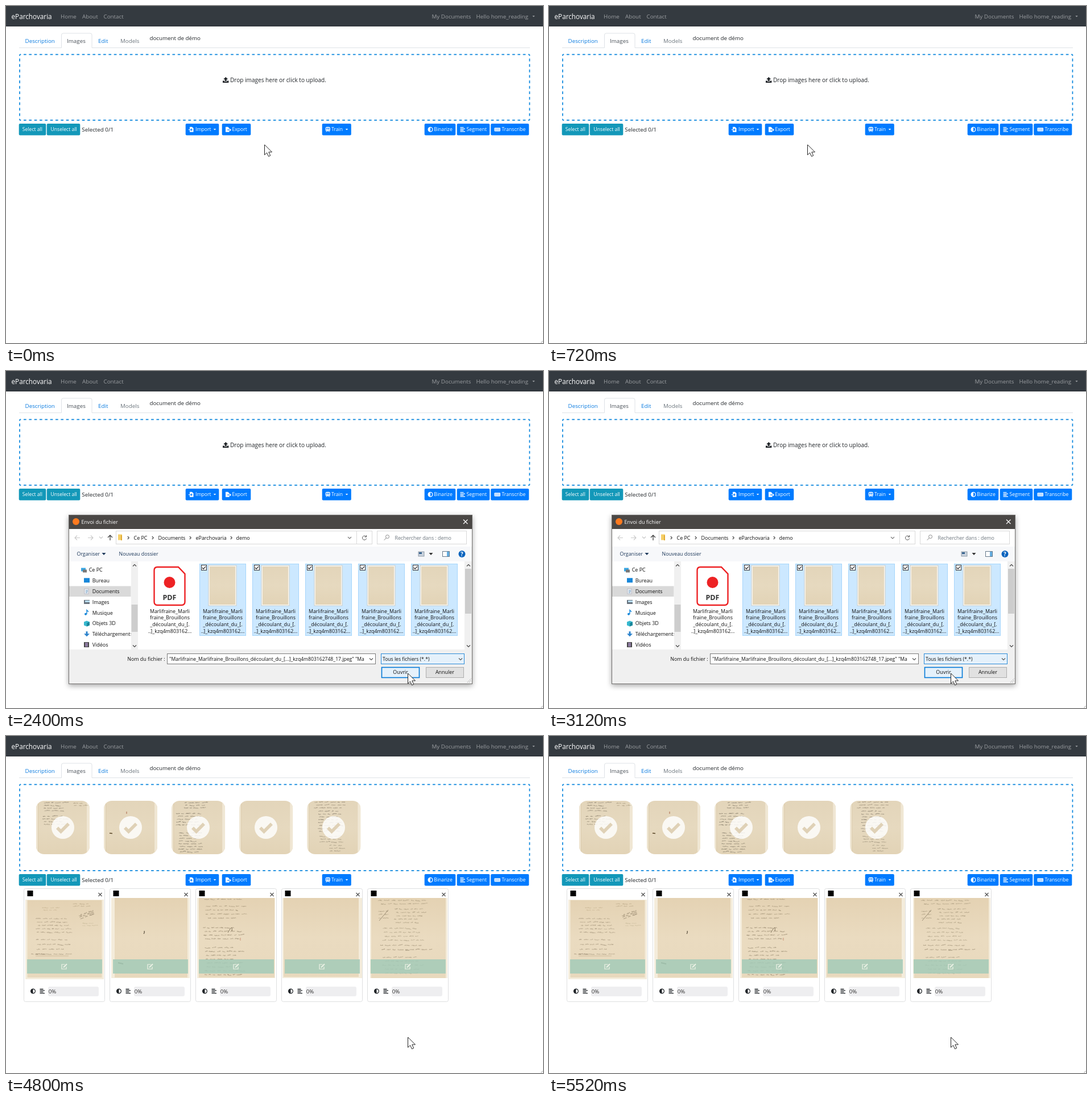
Animation of 944 by 593 pixels, one loop 6000 ms. Source, as an HTML page:

```html
<!DOCTYPE html>
<html lang="en">
<head>
<meta charset="utf-8">
<title>Image upload</title>
<style>
html, body { margin: 0; width: 100%; height: 100%; overflow: hidden; background: #fff; }
svg { display: block; width: 944px; height: 593px; font-family: "Open Sans", "Noto Sans", sans-serif; }
text { white-space: pre; }
</style>
</head>
<body>
<svg id="stage" viewBox="0 0 944 593"></svg>
<script>
const BLUE = '#007bff', INK = '#212529', GREY = '#6c757d';
const APP = 'eParchovaria';
const FILE = ['Marlifraine_Marli', 'fraine_Brouillons', '_découlant_du_[.', '..]_kzq4m803162...'];
const FILE_LIST = '"Marlifraine_Marlifraine_Brouillons_découlant_du_[...]_kzq4m803162748_17.jpeg" "Ma';

const rect = (x, y, w, h, fill, more = '') => `<rect x="${x}" y="${y}" width="${w}" height="${h}" fill="${fill}" ${more}/>`;
const frame = (x, y, w, h, fill, stroke, more = '') => rect(x + .5, y + .5, w - 1, h - 1, fill, `stroke="${stroke}" ${more}`);
const circle = (x, y, r, fill, more = '') => `<circle cx="${x}" cy="${y}" r="${r}" fill="${fill}" ${more}/>`;
const text = (x, y, s, size = 10, fill = INK, more = '') => `<text x="${x}" y="${y}" font-size="${size}" fill="${fill}" ${more}>${s}</text>`;
const line = (d, stroke, width = 1, more = '') => `<path d="${d}" fill="none" stroke="${stroke}" stroke-width="${width}" ${more}/>`;
const shape = (d, fill, more = '') => `<path d="${d}" fill="${fill}" ${more}/>`;
const at = (x, y, body) => `<g transform="translate(${x} ${y})">${body}</g>`;
const group = (id, body) => `<g id="${id}">${body}</g>`;
const each = (n, fn) => Array.from({ length: n }, (_, i) => fn(i)).join('');
const caret = (x, y, fill) => shape(`M${x - 2.2} ${y - 1}h4.4l-2.2 2.4z`, fill);
const chevron = (x, y, c, dir = 'down') => line({
  down: `M${x - 3} ${y - 1.5}l3 3 3-3`, up: `M${x - 3} ${y + 1.5}l3-3 3 3`, right: `M${x - 1.2} ${y - 2.5}l2.5 2.5-2.5 2.5`
}[dir], c, 1.1);

function random(seed) {
  return () => {
    seed = (seed * 1664525 + 1013904223) >>> 0;
    return seed / 4294967296;
  };
}

// Lines of illegible handwriting.
function scribble(x, y, w, rows, gap, seed, color = '#65563f', height = 2.6, opacity = .55) {
  const rnd = random(seed);
  let d = '';
  for (let row = 0; row < rows; row++) {
    let px = x + rnd() * w * .08;
    const end = x + w * (.72 + rnd() * .28);
    while (px < end) {
      d += `M${px.toFixed(1)} ${(y + row * gap).toFixed(1)}`;
      for (let n = 2 + rnd() * 5; n > 0; n--) {
        const step = .9 + rnd() * 1.1;
        d += `q${(step * .6).toFixed(1)} ${(-height * (.5 + rnd())).toFixed(1)} ${step.toFixed(1)} ${(rnd() * .8 - .4).toFixed(1)}`;
        px += step;
      }
      px += 2 + rnd() * 2;
    }
  }
  return line(d, color, .6, `opacity="${opacity}"`);
}

const icons = {
  upload: c => shape('M5.2 0L9.2 4H6.8V7.2H3.6V4H1.2ZM0 6.4H2.8V8H7.6V6.4H10.4V10H0Z', c),
  half: c => circle(4.5, 4.5, 3.9, 'none', `stroke="${c}" stroke-width="1.2"`) + shape('M4.5 .6A3.9 3.9 0 0 0 4.5 8.4Z', c),
  align: c => line('M0 1H6M0 3.4H8.5M0 5.8H6M0 8.2H8.5', c, 1.3),
  import: c => shape('M2 0H6L8.5 2.5V9H2Z', c) + line('M0 5H5.5M4 3L6 5 4 7', BLUE, 1.1) + line('M0 5H2', c, 1.2),
  export: c => shape('M0 0H4.3L6.5 2.5V9H0Z', c) + line('M3 5.3H6.5', BLUE, 1.2) + line('M6.5 5.3H9M7.3 3.4L9.2 5.3 7.3 7.2', c, 1.2),
  train: c => rect(.3, 0, 8, 7.5, c, 'rx="2"') + rect(1.6, 1.7, 2.2, 2.2, BLUE) + rect(4.8, 1.7, 2.2, 2.2, BLUE)
    + circle(2.6, 5.6, .8, BLUE) + circle(6, 5.6, .8, BLUE) + line('M2.5 7.5L1.2 9M6.1 7.5L7.4 9', c),
  keyboard: c => rect(0, 1.5, 10.5, 6.2, c, 'rx="1"') + line('M1.4 3.5H9.2M1.4 5.7H9.2', BLUE, 1, 'stroke-dasharray="1.2 1"'),
  edit: c => line('M6.5 2H1V10H9V6', c, 1.2) + line('M4 7.2L10 1.2', c, 2)
};

function button(x, w, label, labelX, icon, iconX, menuX) {
  return rect(x - .3, 207, w + .6, 20.5, icon ? BLUE : '#1398b9', 'rx="2"')
    + text(labelX, 220.4, label, 8.65, '#fff')
    + (icon ? at(iconX, 212.7, icons[icon]('#fff')) : '')
    + (menuX ? caret(menuX, 217, '#fff') : '');
}

function header() {
  const link = (x, s) => text(x, 22, s, 9.8, '#9a9da0');
  const tab = (x, s, fill) => text(x, 64.6, s, 9.8, fill);
  return rect(0, 0, 944, 36, '#343a40') + rect(0, 35, 944, 1, '#2c3136')
    + text(9.5, 23.2, APP, 11.75, '#fff')
    + link(96, 'Home') + link(134, 'About') + link(171.5, 'Contact')
    + link(748.5, 'My Documents') + link(826.5, 'Hello home_reading') + caret(927.5, 18, '#9a9da0')
    + line('M23 73.5H97.5V51q0-3 3-3H148q3 0 3 3V73.5H921', '#dee2e6')
    + tab(33.5, 'Description', '#0a7be0') + tab(107, 'Images', '#495057')
    + tab(162, 'Edit', '#0a7be0') + tab(201, 'Models', GREY)
    + text(252.5, 59.8, 'document de démo', 9.75)
    + line('M940.5 592.5l3-3', '#999');
}

function toolbar() {
  return button(23, 47, 'Select all', 28.8) + button(72, 58, 'Unselect all', 78.5)
    + text(133.3, 221.3, 'Selected 0/1', 9.8)
    + button(316, 58, 'Import', 333, 'import', 321, 367) + button(380, 50, 'Export', 397.5, 'export', 386)
    + button(556, 50.5, 'Train', 572, 'train', 561.5, 599)
    + button(736, 54, 'Binarize', 752.3, 'half', 741.5) + button(793, 57, 'Segment', 809.5, 'align', 798.5)
    + button(852.5, 66.5, 'Transcribe', 871.5, 'keyboard', 858.5);
}

const paper = (x, y, w, h, more = '') => rect(x, y, w, h, 'url(#paper)', more);

function thumbnails() {
  const writing = [
    scribble(66, 118, 40, 4, 4.8, 7, '#4a4336', 2) + scribble(118, 119, 22, 2, 4, 9, '#8a7b61', 2)
      + scribble(64, 142, 45, 4, 4.6, 11, '#5a503f', 2),
    line('M212 133v4', '#a4583c', .9) + line('M182 171l5 .5', '#584526', 1.6),
    scribble(313, 118, 42, 3, 4.5, 21, '#463e32', 2) + scribble(298, 137, 48, 5, 5, 23, '#463e32', 2)
      + scribble(303, 171, 43, 8, 4.8, 25, '#463e32', 2),
    '',
    scribble(541, 117, 68, 3, 5, 31, '#5a4f3e', 2) + scribble(548, 133, 45, 8, 5, 33, '#4d463b', 2)
      + scribble(550, 177, 46, 3, 5, 35, '#6a604f', 2) + scribble(568, 193, 26, 3, 5, 37, '#6a604f', 2)
  ];
  return each(5, i => {
    const x = 53 + 119.1 * i;
    return `<g clip-path="url(#round${i})">` + paper(x, 114, 94, 94) + rect(x, 114, 3, 94, '#eee4cf')
      + rect(x + 3, 114, 1, 94, '#d6c5a3', 'opacity=".6"') + rect(x + 89, 114, 5, 94, '#f0e7d4') + writing[i] + '</g>';
  });
}

function progressBars() {
  const bar = (x, y, w, h, fill) => rect(x, y, w, h, fill, `rx="${h / 2}" stroke="#b5a88f" stroke-width=".7"`);
  return bar(69, 155, 62, 12, 'url(#faded)') + bar(188, 155, 62, 12, '#fff')
    + shape('M218 155H194a6 6 0 0 0 0 12H218Z', 'url(#dark)')
    + each(3, i => bar(303.5 + 119 * i, 154, 68, 13.5, '#fff'));
}

const checks = () => each(5, i => at(100 + 119 * i, 161,
  circle(0, 0, 20, '#fff', 'opacity=".82"') + line('M-10 0.5L-3.5 7 10-6.5', '#dfd1b6', 5.6)));

function cardImage(i) {
  const margin = (x, y, w, h) => rect(x, y, w, h, '#f4ecdb');
  const sheet = (x, y, w, h) => rect(x, y, w, h, 'url(#sheet)');
  return [
    margin(34, 288, 138, 140) + sheet(37.5, 289, 131, 136)
      + scribble(63, 303, 32, 2, 4, 41, '#b5a37e', 2.4) + scribble(117, 296, 33, 2, 4, 42, '#9d8b68', 2)
      + at(128, 317, `<g transform="rotate(-20)">${scribble(0, 0, 27, 3, 3, 43, '#6f624c', 3)}</g>`)
      + scribble(134, 330, 24, 2, 4, 44, '#b6a887', 2) + scribble(51, 322, 66, 5, 6, 45, '#81725a', 2.4)
      + scribble(51, 359, 68, 4, 8.5, 46, '#81725a', 2.4) + scribble(44, 384, 22, 1, 4, 47, '#6b5b43', 2)
      + line('M52 387H110', '#b9a684', .6),
    margin(185, 285, 138, 141) + sheet(191, 285, 128, 140) + line('M243 343q1 3-1 5', '#59503f', 1.2)
      + line('M197 399l9 2', '#75654a', 2.2),
    margin(336, 285, 137, 141) + sheet(339, 285, 133, 140)
      + scribble(347, 288, 68, 1, 6, 51, '#7a6b52', 2.2) + scribble(350, 300, 68, 4, 7, 52, '#7a6b52', 2.2)
      + scribble(345, 338, 70, 4, 6.5, 53, '#71634c', 2.4) + scribble(348, 373, 70, 8, 6.8, 54, '#665942', 2.4)
      + line('M390 346q9-16 7-3', '#7a6c54', .9) + line('M412 355v5', '#c98a6f', .9),
    margin(486, 285, 140, 141) + sheet(488, 285, 132, 139),
    margin(640, 285, 136, 141) + sheet(642, 285, 131, 141)
      + scribble(652, 290, 85, 2, 6, 61, '#82745a', 2.3) + scribble(682, 305, 54, 5, 6, 62, '#82745a', 2.3)
      + scribble(654, 309, 18, 3, 6, 63, '#82745a', 2.3) + scribble(661, 339, 74, 4, 7, 64, '#8d8066', 2.3)
      + scribble(656, 369, 98, 2, 7.5, 65, '#75674e', 2.3) + scribble(661, 390, 70, 5, 7, 66, '#7c7056', 2.3)
      + line('M656 325L672 306M702 377h7', '#8a7c63', .8)
  ][i];
}

function card(i) {
  const x = 31 + 151 * i;
  return frame(x, 268, 143, 200, '#fff', '#dedfe0', 'rx="3"')
    + rect(x + 6.5, 272, 10, 10, '#000', 'rx=".6"')
    + line(`M${x + 131.5} 276l6 6m0-6l-6 6`, '#555', 1.3)
    + cardImage(i)
    + rect(x + 6, 393, 132, 25, '#a5cbb9', 'opacity=".86"') + at(x + 66, 400, icons.edit('#edf2e6'))
    + at(x + 12, 444.5, icons.half(INK)) + at(x + 28.5, 444.5, icons.align(INK))
    + rect(x + 43, 441, 89, 17, '#eeeef0', 'rx="3"') + text(x + 43.7, 453, '0%', 9.7, '#333');
}

const folderIcons = [
  rect(0, 1, 8, 6, '#38a6e3') + rect(3, 4, 7, 5, '#777'),
  rect(0, 0, 10, 8, '#1787d9'),
  rect(1, 0, 7, 9, '#eef1f4', 'stroke="#aab" stroke-width=".7"') + line('M3 3H7M3 5H7M3 7H6', '#4784b5', .7),
  rect(0, 1, 10, 7, '#66717c') + rect(2, 2, 8, 3, '#bde1f4'),
  circle(3, 7, 2, '#1687d9') + line('M5 7V0l3 3', '#1687d9', 1.4),
  shape('M5 0L10 2V8L5 10 0 8V2Z', '#36b8ce') + shape('M5 4L10 2V8L5 10Z', '#1a879b'),
  line('M5 0V5', '#2d83cc', 3) + shape('M0 4H10L5 9Z', '#2d83cc'),
  rect(0, 0, 9, 9, '#444') + rect(2, 1, 5, 7, '#8c7ba0')
];

function fileLabel(x) {
  return FILE.map((s, i) => text(x, 425.7 + i * 11.7, s, 8.9, '#111', 'text-anchor="middle"')).join('');
}

function dialog() {
  const label = (x, y, s, fill = '#111', size = 8.95) => text(x, y, s, size, fill);
  const places = ['Ce PC', 'Bureau', 'Documents', 'Images', 'Musique', 'Objets 3D', 'Téléchargements', 'Vidéos'];
  const sheet = i => {
    const x = 340 + 93 * i;
    return frame(x, 339, 82, 127, '#cce8ff', '#a5d5fb')
      + rect(x + 16, 342, 49, 71, '#f8f6ef', 'stroke="#bcb8af" stroke-width=".6"') + paper(x + 18, 344, 45, 67)
      + frame(x + 3, 341, 10, 10, '#fff', '#333') + line(`M${x + 5} 346l2 2.3 4-4.5`, '#222', 1.2)
      + fileLabel(x + 41);
  };
  return rect(110, 253, 710, 298, '#f0f0f0', 'filter="url(#shadow)"')
    + rect(110, 253, 710, 25, '#4a4745') + circle(123, 265, 6, '#ff7a1f')
    + label(132.5, 269, 'Envoi du fichier', '#fff') + line('M804 261.5l7.5 7.5m0-7.5l-7.5 7.5', '#fff', 1.2)
    + rect(110.5, 278, 709, 31, '#fff') + rect(110.5, 309, 709, 26, '#f7f8fa') + rect(110.5, 335, 709, 155, '#fff')
    + line('M130 293.5H121m4-4l-4 4 4 4M144 293.5H153m-4-4l4 4-4 4', '#c9c9c9', 1.1) + chevron(167, 293, '#c5c5c5')
    + line('M183 298V289m-4 4l4-4 4 4', '#444', 1.3)
    + frame(193, 281, 424, 24, '#fff', '#d9d9d9') + frame(616, 281, 28, 24, '#fff', '#d9d9d9')
    + rect(197, 287.5, 7, 10, '#f6cf68') + rect(202, 289, 2, 9, '#e0ab35')
    + label(224.5, 296.6, 'Ce PC') + label(267.5, 296.6, 'Documents') + label(333.5, 296.6, APP) + label(404.5, 296.6, 'demo')
    + [215, 258, 324, 396].map(x => chevron(x, 293.5, '#444', 'right')).join('') + chevron(604, 293.5, '#777')
    + line('M633 291.5a3.6 3.6 0 1 0 .6 3M633.5 289v3h-3', '#555')
    + frame(652, 281, 158, 24, '#fff', '#d9d9d9') + circle(670.5, 291.5, 3, 'none', 'stroke="#888"') + line('M668.3 293.7l-3.5 4', '#888')
    + label(683.5, 296.6, 'Rechercher dans : demo', GREY, 8.8)
    + label(124.5, 325, 'Organiser', '#1e395b', 8.8) + shape('M168.5 320h7l-3.5 4z', '#1e395b')
    + label(198.5, 325, 'Nouveau dossier', '#1e395b', 8.8)
    + rect(725, 318, 10, 8, '#cbd4df', 'stroke="#7a8794" stroke-width=".8"') + rect(726, 319, 5, 3, '#38648f') + shape('M743.5 320h7l-3.5 4z', '#333')
    + frame(767, 317, 13, 10, '#fff', '#65788a') + rect(775, 318, 4, 8, '#66aee1')
    + circle(801.5, 322, 6, '#0862bd') + text(801.5, 326, '?', 10, '#fff', 'text-anchor="middle" font-weight="bold"')
    + rect(110.5, 378.5, 109, 18.5, '#d9d9d9')
    + `<g clip-path="url(#side)">${places.map((s, i) => {
      const y = 350 + i * 18.8, x = i ? 137 : 132;
      return at(x, y - 4.5, folderIcons[i]) + label(i ? 151.7 : 145.7, y + 3.3, s);
    }).join('')}</g>`
    + rect(220, 335, 12, 155, '#f0f0f0') + rect(220.5, 411, 11, 48, '#cdcdcd') + chevron(226, 342, '#444', 'up') + chevron(226, 484, '#444')
    + rect(806, 335, 13.5, 155, '#f0f0f0') + rect(807, 348, 11, 79, '#cdcdcd') + chevron(813, 342, '#444', 'up') + chevron(813, 484, '#444')
    + shape('M266 345H303L314.5 357V406q0 6-6 6H266q-5.5 0-5.5-6V351q0-6 5.5-6Z', '#fff', 'stroke="#ed2224" stroke-width="2.4"')
    + circle(287.5, 372, 10, '#ed2224') + text(287.5, 403, 'PDF', 12.5, '#333', 'text-anchor="middle" font-weight="bold"')
    + fileLabel(288) + each(5, sheet)
    + text(279.5, 510, 'Nom du fichier :', 8.9, '#111', 'text-anchor="end"')
    + frame(283, 497, 367, 19, '#fff', '#7a7a7a')
    + `<g clip-path="url(#field)">${label(287, 510, FILE_LIST, '#111', 8.6)}</g>` + chevron(642, 507, '#555')
    + frame(659, 497, 147, 19, '#e5f1fb', '#2b8bd8') + label(662, 510, 'Tous les fichiers (*.*)', '#111', 8.6) + chevron(799, 507, '#555')
    + rect(660.5, 521.5, 66, 18, '#e5f1fb', 'stroke="#0078d7" stroke-width="1.6"') + text(693.5, 533.4, 'Ouvrir', 8.95, '#111', 'text-anchor="middle"')
    + frame(738, 521, 67, 19, '#e1e1e1', '#adadad') + text(771.5, 533.4, 'Annuler', 8.95, '#111', 'text-anchor="middle"')
    + line('M811 548l7-7M814 548l4-4', '#b8b8b8', 1.2, 'stroke-dasharray="1.5 1.5"')
    + frame(110, 253, 710, 298, 'none', '#6f6d6b');
}

// Each side holds a whole number of dashes, with half a dash at both corners.
function dashedSide(d, length) {
  const dash = length / Math.round(length / 9.36) / 2;
  return line(d, '#0b87dd', 1.7, `stroke-dasharray="${dash}" stroke-dashoffset="${dash / 2}"`);
}

function dashedBox(left, top, right, bottom) {
  return [top, bottom].map(y => dashedSide(`M${left} ${y}H${right}`, right - left)).join('')
    + [left, right].map(x => dashedSide(`M${x} ${top}V${bottom}`, bottom - top)).join('');
}

const gradient = (id, ...colors) => `<linearGradient id="${id}" x2="0" y2="1">${colors.map((c, i) =>
  `<stop offset="${i / (colors.length - 1)}" stop-color="${c}"/>`).join('')}</linearGradient>`;
const clip = (id, x, y, w, h, rx = 0) => `<clipPath id="${id}">${rect(x, y, w, h, '#000', `rx="${rx}"`)}</clipPath>`;

const stage = document.getElementById('stage');
stage.innerHTML = '<defs>' + gradient('paper', '#e3d5ba', '#e6d9bf', '#e2d3b6') + gradient('sheet', '#e4d2b3', '#eadbc0', '#e8d9bd')
  + gradient('dark', '#666', '#444') + gradient('faded', '#8f8880', '#77716b')
  + each(5, i => clip('round' + i, 53 + 119.1 * i, 114, 94, 94, 14))
  + clip('side', 110, 335, 109.5, 155) + clip('field', 284, 498, 351, 17)
  + '<filter id="shadow" x="-5%" y="-8%" width="110%" height="118%"><feDropShadow dx="0" dy="3" stdDeviation="5" flood-opacity=".35"/></filter></defs>'
  + rect(0, 0, 944, 593, '#fff') + header()
  + group('shortZone', dashedBox(24, 85.4, 920.4, 200.8)) + group('tallZone', dashedBox(24, 85.4, 920.4, 236.8))
  + group('prompt', at(381, 125, icons.upload(INK)) + text(394, 133.7, 'Drop images here or click to upload.', 10.05))
  + group('toolbar', toolbar())
  + group('thumbs', thumbnails()) + group('bars', progressBars()) + group('checks', checks())
  + group('first', card(0)) + group('rest', each(4, i => card(i + 1)))
  + group('dialog', dialog())
  + group('arrow', shape('M.5 0V18L4.6 14.2 7.5 20.7 10.7 19.2 7.8 13H13.5Z', '#fff', 'stroke="#222"'))
  + group('hand', at(433, 143, shape('M6 1.6C6.7 0 9 0 9.4 1.8L10.6 8c1-.8 2.4-.5 2.9.7 1-.6 2.3-.3 2.8.9 1.1-.3 2.1.3 2.3 1.6l.6 5c.2 4.2-1.8 6.8-5 7.3l-3.2.2c-2.8-.1-4.2-1.5-5.7-3.8L.8 14.1C0 12.4 1.6 11 3.2 12.2l4 2.5Z', '#fff', 'stroke="#222" stroke-width="1.1"')
    + line('M10.6 8l.7 3.8M13.5 8.7l.6 3.4M16.3 9.6l.4 2.8', '#222')));

const $ = id => document.getElementById(id);
const show = (id, on) => $(id).setAttribute('visibility', on ? 'visible' : 'hidden');
const pointer = [[454, 244], null, [706, 532], [706, 530], [706, 530]];

function render(time) {
  const step = Math.floor((time % 6000) / 1200);
  const uploaded = step > 2;
  $('toolbar').setAttribute('transform', `translate(0 ${uploaded ? 36 : 0})`);
  show('shortZone', !uploaded);
  show('prompt', !uploaded);
  show('tallZone', uploaded);
  show('thumbs', uploaded);
  show('first', uploaded);
  show('bars', step === 3);
  show('checks', step === 4);
  show('rest', step === 4);
  show('dialog', step === 2);
  show('hand', step === 1);
  show('arrow', step !== 1);
  if (pointer[step]) $('arrow').setAttribute('transform', `translate(${pointer[step]})`);
}

const start = performance.now();
function tick() {
  render(performance.now() - start);
  requestAnimationFrame(tick);
}
render(0);
requestAnimationFrame(tick);
</script>
</body>
</html>
```
